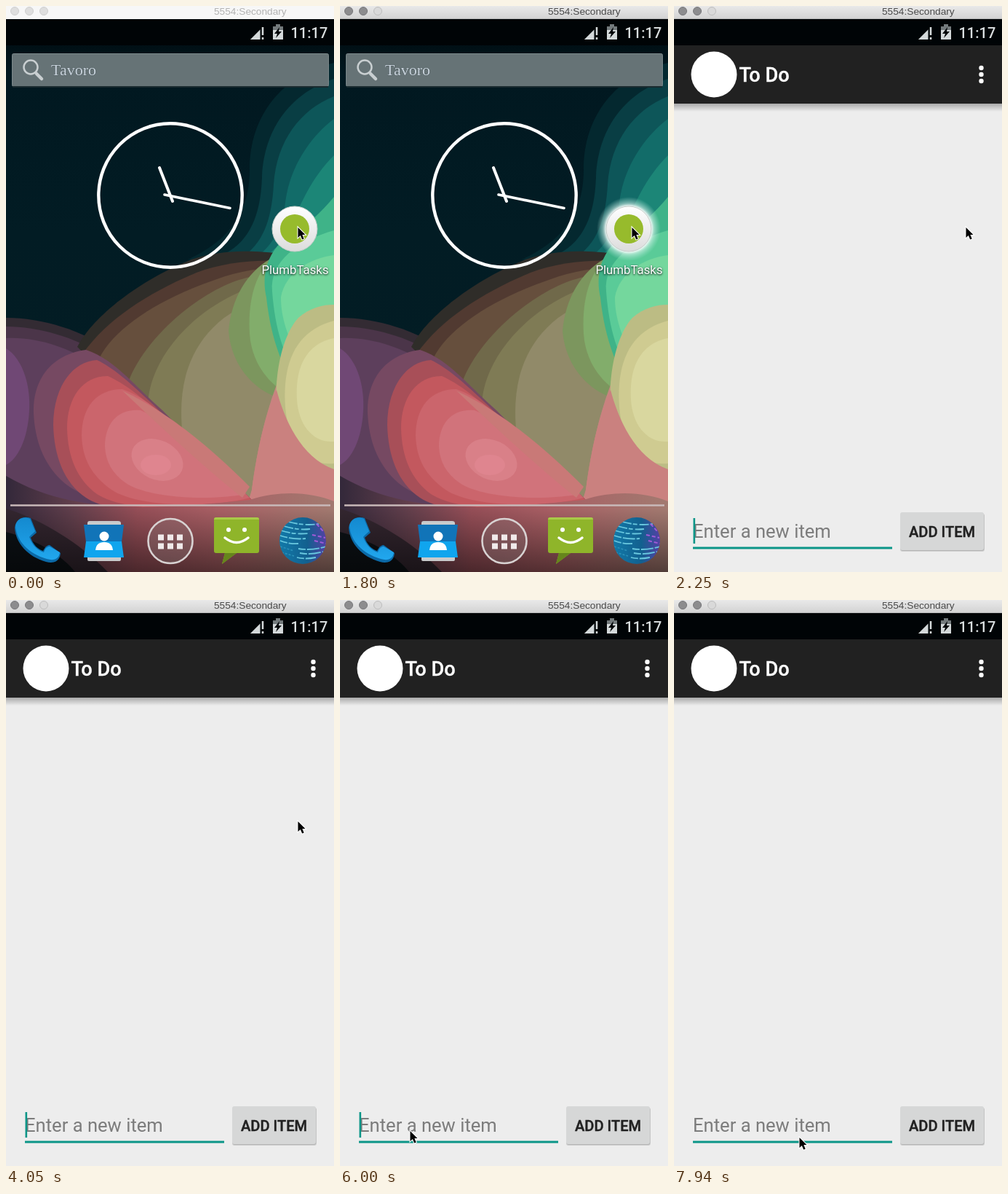
An HTML page that plays this animation: 451x777 px, repeating every 8000 ms.

```html
<!DOCTYPE html>
<html lang="en">
<head>
<meta charset="utf-8">
<title>To Do</title>
<style>
html, body { margin: 0; width: 100%; height: 100%; overflow: hidden; background: #000; }
svg { display: block; width: 451px; height: 777px; }
text { font-family: Roboto, "Open Sans", sans-serif; }
.title { font: 13.7px "Liberation Sans", sans-serif; }
.medium { font-weight: 500; stroke-width: .4px; }

.active, .glow, .app, .caret, .pointer { animation: 8s step-end infinite; }
.active { animation-name: activate; }
.glow { animation-name: press; }
.app { animation-name: launch; transform-origin: 0 0; }
.caret { animation-name: blink; }
.pointer { animation-name: travel; transform-origin: 0 0; }

@keyframes activate { 0% { visibility: hidden } 1.875%, 100% { visibility: visible } }
@keyframes press { 0% { visibility: hidden } 22.5%, 100% { visibility: visible } }
@keyframes launch {
  0% { visibility: hidden; transform: matrix(.956, 0, 0, .949, 19.5, 67.5) }
  26.25% { visibility: visible; transform: matrix(.956, 0, 0, .949, 19.5, 67.5) }
  28.125%, 100% { visibility: visible; transform: matrix(1, 0, 0, 1, 0, 54) }
}
@keyframes blink {
  0%, 37.5%, 50.625%, 63.75%, 75%, 88.125% { opacity: 1 }
  31.875%, 43.125%, 56.25%, 69.375%, 82.5%, 93.625%, 100% { opacity: 0 }
}
@keyframes travel {
  0% { transform: translate(401px, 303px) }
  63.75% { transform: translate(394px, 312px) }
  65.625% { transform: translate(361px, 356px) }
  67.5% { transform: translate(296px, 448px) }
  69.375% { transform: translate(214px, 566px) }
  71.25% { transform: translate(150px, 655px) }
  73.125% { transform: translate(108px, 712px) }
  75% { transform: translate(96px, 728px) }
  76.875% { transform: translate(104px, 735px) }
  78.75% { transform: translate(148px, 743px) }
  80.625% { transform: translate(216px, 738px) }
  82.5% { transform: translate(288px, 728px) }
  84.375% { transform: translate(342px, 717px) }
  86.25% { transform: translate(380px, 708px) }
  88.125% { transform: translate(401px, 702px) }
  89.875% { transform: translate(409px, 700px) }
  91.75% { transform: translate(421px, 707px) }
  93.625% { transform: translate(398px, 718px) }
  95.5% { transform: translate(318px, 729px) }
  97.375% { transform: translate(226px, 735px) }
  99.25%, 100% { transform: translate(172px, 737px) }
}
</style>
</head>
<body>
<svg viewBox="0 0 451 777">
  <defs>
    <linearGradient id="bar" x2="0" y2="1"><stop stop-color="#e9e9e9"/><stop offset="1" stop-color="#d2d2d2"/></linearGradient>
    <linearGradient id="sky" x2="0" y2="1">
      <stop stop-color="#000406"/><stop offset=".12" stop-color="#011820"/>
      <stop offset=".4" stop-color="#021c24"/><stop offset="1" stop-color="#041d24"/>
    </linearGradient>
    <linearGradient id="floor" x2="0" y2="1">
      <stop stop-color="#000" stop-opacity="0"/><stop offset="1" stop-color="#000" stop-opacity=".5"/>
    </linearGradient>
    <linearGradient id="ground">
      <stop stop-color="#33283a"/><stop offset=".2" stop-color="#603e4b"/><stop offset=".4" stop-color="#954e57"/>
      <stop offset=".65" stop-color="#a85f64"/><stop offset="1" stop-color="#a27a70"/>
    </linearGradient>
    <linearGradient id="drop" x2="0" y2="1"><stop stop-color="#000" stop-opacity=".29"/><stop offset="1" stop-color="#000" stop-opacity="0"/></linearGradient>
    <linearGradient id="blue" x2="0" y2="1"><stop stop-color="#1489cf"/><stop offset="1" stop-color="#21a7ee"/></linearGradient>
    <linearGradient id="globe"><stop stop-color="#1279a8"/><stop offset=".6" stop-color="#12608f"/><stop offset="1" stop-color="#5340a4"/></linearGradient>
    <radialGradient id="halo"><stop offset=".7" stop-color="#fff"/><stop offset=".8" stop-color="#d8f4ec" stop-opacity=".55"/><stop offset="1" stop-color="#b0e8da" stop-opacity="0"/></radialGradient>
    <linearGradient id="disc" x2="0" y2="1"><stop stop-color="#fff"/><stop offset="1" stop-color="#dcdcdc"/></linearGradient>
    <clipPath id="ball"><circle cx="408" cy="734" r="32"/></clipPath>
  </defs>

  <!-- wallpaper -->
  <rect width="451" height="777" fill="url(#sky)"/>
  <g>
    <path d="M451 78C380 95 335 150 335 225C335 290 300 325 250 348L451 370Z" fill="#04282f"/>
    <path d="M451 100C395 118 355 165 352 235C350 295 330 330 290 345L451 375Z" fill="#093e44"/>
    <path d="M451 124C405 142 372 185 368 245C365 300 350 330 320 348L451 385Z" fill="#0d5659"/>
    <path d="M451 155C420 178 390 220 384 270C380 305 365 335 335 350L451 395Z" fill="#126c69"/>
    <path d="M451 205C425 230 404 270 394 300C380 325 365 340 345 352L451 400Z" fill="#1c8677"/>

    <path d="M0 428C50 428 105 445 150 476L340 685L0 705Z" fill="#332b33"/>
    <path d="M0 440C45 440 95 455 130 478L335 685L0 700Z" fill="#4b3549"/>
    <path d="M98 468C120 425 185 376 255 348C310 330 360 336 451 350V690H330Z" fill="#2f2d29"/>
    <path d="M105 478C140 428 200 392 262 366C310 348 370 345 451 356V690H330Z" fill="#513a31"/>
    <path d="M128 484C150 440 215 400 290 375C330 360 380 354 451 362V690H330Z" fill="#664f3d"/>
    <path d="M165 525C180 475 235 415 300 384C335 367 390 360 451 370V690H335Z" fill="#70694a"/>
    <path d="M195 550C195 500 235 435 312 397C350 378 400 370 451 380V690H335Z" fill="#7f7b55"/>
    <path d="M243 590C236 530 246 470 300 428C340 398 400 400 451 420V690H335Z" fill="#918a69"/>
    <path d="M306 446C310 400 332 366 362 348H451V540H385C350 535 310 500 306 446Z" fill="#7c965e"/>
    <path d="M335 450C332 400 345 368 362 350L451 340V540H398C360 520 338 490 335 450Z" fill="#82ad6b"/>
    <path d="M358 400C350 365 362 332 392 314C415 300 432 285 451 262V530H400C378 490 364 455 358 400Z" fill="#3fb388"/>
    <path d="M366 392C362 350 402 322 451 308V510H402C382 480 370 445 366 392Z" fill="#5acb98"/>
    <path d="M378 400C384 366 418 346 451 342V490H404C392 460 378 435 378 400Z" fill="#74d79d"/>
    <path d="M338 664C346 604 358 556 374 515L451 500V690H335Z" fill="#c58680"/>
    <path d="M372 560C368 505 380 452 402 428C418 414 436 410 451 410V650C410 655 380 620 372 560Z" fill="#bcbc84"/>
    <path d="M384 550C380 490 398 446 451 432V628C412 632 388 600 384 550Z" fill="#cfcb91"/>
    <path d="M400 540C397 490 418 462 451 456V598C422 600 402 575 400 540Z" fill="#d9d79f"/>
    <path d="M338 664C346 604 358 556 372 527C382 565 405 620 451 636V690H330Z" fill="#ca817f"/>

    <path d="M0 456C45 454 85 470 120 490L340 680C240 710 80 700 0 650Z" fill="#5d3f5c"/>
    <path d="M38 560C36 510 65 478 110 472C150 485 180 525 215 555L340 680C250 700 120 695 75 650C50 625 40 595 38 560Z" fill="#764962"/>
    <path d="M0 470C20 482 34 515 32 555C30 595 16 622 0 630Z" fill="#704875"/>
    <path d="M65 575C65 525 90 488 125 486C165 505 205 552 340 680C260 698 150 702 110 675C80 655 66 618 65 575Z" fill="#a84f58"/>
    <path d="M84 580C84 538 105 508 140 508C180 526 215 562 340 680C270 695 165 696 125 670C98 650 85 620 84 580Z" fill="#c3585e"/>
    <path d="M104 590C104 550 125 526 160 526C200 540 240 580 335 675C280 690 180 688 145 664C118 645 105 622 104 590Z" fill="#cb656c"/>
    <path d="M136 605C136 572 155 552 185 555C225 572 270 615 330 670C275 680 195 675 165 655C146 642 137 625 136 605Z" fill="#d1737b"/>
    <path d="M160 528C195 545 250 575 335 660L325 675C280 640 220 585 160 528Z" fill="#c97977"/>
    <ellipse cx="208" cy="623" rx="37" ry="27" transform="rotate(24 208 623)" fill="#d98088"/>
    <ellipse cx="206" cy="630" rx="21" ry="14" fill="#df858f"/>

    <path d="M0 645C90 698 200 692 335 678C380 664 420 668 451 680V777H0Z" fill="url(#ground)"/>
    <path d="M0 690C50 705 105 740 140 777H0Z" fill="#33262f"/>
    <path d="M0 722C40 732 75 752 95 777H0Z" fill="#0d1216"/>
  </g>
  <rect y="690" width="451" height="87" fill="url(#floor)"/>

  <!-- search bar -->
  <rect x="8.500" y="65.500" width="435" height="45" rx="2" fill="#667376" stroke="#7c888a"/>
  <path d="M9 111H443" stroke="#192a2f" stroke-width="2"/>
  <g fill="none" stroke="#c9cfd1" stroke-linecap="round">
    <circle cx="34" cy="84" r="9.500" stroke-width="2.500"/><path d="M42 93L49 100" stroke-width="4.500"/>
  </g>
  <text x="62" y="95" font-size="22" fill="#cbd6df" stroke="#3d484d" stroke-width=".6" paint-order="stroke" style="font-family:'Liberation Serif',serif">Tavoro</text>

  <!-- clock -->
  <g fill="none" stroke="#fff" stroke-linecap="round">
    <circle cx="226" cy="260" r="98.700" stroke-width="4.400"/>
    <path d="M211 222L229 268" stroke-width="4"/><path d="M218 259L308 277.500" stroke-width="3.600"/>
  </g>

  <!-- launcher icon -->
  <circle class="glow" cx="397" cy="306" r="44" fill="url(#halo)"/>
  <circle cx="397" cy="306" r="31" fill="url(#disc)" stroke="#c3ccc8"/>
  <circle cx="397" cy="306" r="20" fill="#97bb2c"/>
  <text x="397.500" y="368" text-anchor="middle" font-size="16.800" fill="#fff" style="text-shadow:0 1px 3px #000">PlumbTasks</text>

  <!-- dock -->
  <path d="M6 685.500H446" stroke="#c9b9b9" stroke-width="2.600"/>
  <path d="M12 716C14 704 24 699 34 703L42 723C37 727 35 729 34 730C37 739 44 746 51 748C54 742 57 740 60 740L75 751C74 762 66 766 55 763C30 756 13 737 12 716Z" fill="#0b6aa8"/>
  <path d="M13 713C15 704 24 700 33 704L40 721C36 725 33 727 32 729C36 740 43 747 52 750C54 744 57 742 60 742L74 750C73 759 66 762 56 759C32 752 14 735 13 713Z" fill="url(#blue)"/>
  <path d="M112 710Q112 707 115 707H154Q158 707 158 710V760Q158 762 155 762H114Q112 762 112 760Z" fill="#c9cbcc"/>
  <path d="M107 712H162L159 736H110Z" fill="#1174b8"/><path d="M110 735H159L162 757H107Z" fill="#10a5ee"/>
  <g fill="#fff"><circle cx="135" cy="728" r="6.500"/><path d="M123 747Q124 736 135 736Q146 736 147 747Z"/></g>
  <circle cx="226" cy="734.500" r="30.500" fill="#8a7d7d" fill-opacity=".3" stroke="#d8d2d2" stroke-width="2.600"/>
  <path d="M209 729.500H243M209 741.500H243" stroke="#f0eaea" stroke-width="8" stroke-dasharray="8 5"/>
  <path d="M289 702H345Q348 702 348 705V748Q348 751 345 751H317L297 766L301 751H289Q286 751 286 748V705Q286 702 289 702Z" fill="#8fb52a"/>
  <path d="M286 705Q286 702 289 702H345Q348 702 348 705Z" fill="#a9ca48"/>
  <path d="M301 751L297 766L317 751Z" fill="#66851c"/>
  <circle cx="306" cy="719" r="3" fill="#fff"/><circle cx="328" cy="719" r="3" fill="#fff"/>
  <path d="M301 730Q317 743 333 730" fill="none" stroke="#fff" stroke-width="3.500" stroke-linecap="round"/>
  <circle cx="408" cy="734" r="32" fill="url(#globe)"/>
  <g clip-path="url(#ball)" fill="none">
    <g stroke="#69c8df" stroke-width="1.800">
      <path d="M388 708Q410 714 430 711M382 714Q402 720 418 718M378 720Q396 726 415 724" stroke-dasharray="13 2 6 3"/>
      <path d="M377 727Q396 733 412 731M377 734Q390 739 402 738M402 745Q420 748 440 742M404 751Q420 754 436 749M400 757Q412 760 426 757" stroke-dasharray="10 2 17 2"/>
    </g>
    <path d="M427 711L437 722M421 726L439 730M424 734L440 738" stroke="#a05ad8" stroke-width="2" stroke-dasharray="5 3"/>
    <path d="M377 742L396 748M379 750L396 755" stroke="#2b91b8" stroke-width="1.500" stroke-dasharray="3 2"/>
  </g>

  <!-- status bar -->
  <rect y="18" width="451" height="36" fill="#000406"/>
  <path d="M355 27V46H336Z" fill="#62696b"/><path d="M349 33V46H336Z" fill="#d4d9da"/>
  <path d="M350 26H356V47H350Z" fill="#000406"/><path d="M353 29V40M353 43V46" stroke="#d4d9da" stroke-width="2.500"/>
  <path d="M371 25H377V28H381V46H367V28H371Z" fill="#737a7c"/><path d="M367 33H381V46H367Z" fill="#d4d9da"/>
  <path d="M376 29L369 38H373L371 44L379 35H375Z" fill="#000406"/>
  <text class="medium" x="391.500" y="44" font-size="20" fill="#d9dedf">11:17</text>

  <!-- title bar -->
  <rect width="451" height="18" fill="#f7f7f7"/>
  <g fill="#dedede" stroke="#cfcfcf"><circle cx="12" cy="7" r="5.500"/><circle cx="32" cy="7" r="5.500"/><circle cx="52" cy="7" r="5.500"/></g>
  <text class="title" x="286" y="12" fill="#b2b2b2">5554:Secondary</text>
  <g class="active">
    <rect width="451" height="18" fill="url(#bar)"/><rect y="17" width="451" height="1" fill="#b8b8b8"/>
    <g fill="#8c8c8e" stroke="#77777a"><circle cx="12" cy="7" r="5.500"/><circle cx="32" cy="7" r="5.500"/></g>
    <circle cx="52" cy="7" r="5.500" fill="#d9d9d9" stroke="#bdbdbd"/>
    <text class="title" x="286" y="12" fill="#4a4a4a">5554:Secondary</text>
  </g>

  <!-- to-do window -->
  <g class="app">
    <rect width="451" height="723" fill="#ededed"/>
    <rect y="80" width="451" height="11" fill="url(#drop)"/>
    <rect width="451" height="80" fill="#212121"/>
    <circle cx="55" cy="40" r="31.500" fill="#fff"/>
    <text class="medium" x="89.500" y="50" font-size="27.200" fill="#fff" stroke="#fff">To Do</text>
    <g fill="#fff"><circle cx="422.500" cy="31" r="3.200"/><circle cx="422.500" cy="40" r="3.200"/><circle cx="422.500" cy="49" r="3.200"/></g>
    <text x="26" y="676" font-size="25.600" fill="#7c7c7c">Enter a new item</text>
    <rect x="26" y="688.500" width="274" height="3" fill="#0b9688"/>
    <rect class="caret" x="26.500" y="649" width="2.600" height="35" fill="#0b9688"/>
    <rect x="311" y="643" width="116" height="52" rx="3" fill="#000" opacity=".12"/>
    <rect x="311.500" y="642" width="115" height="52" rx="3" fill="#000" opacity=".13"/>
    <rect x="311" y="641" width="115" height="52" rx="3" fill="#d6d7d7"/>
    <text class="medium" x="368.500" y="674.500" text-anchor="middle" font-size="20.100" fill="#212121" stroke="#212121">ADD ITEM</text>
  </g>

  <path class="pointer" d="M.5 1V15L3.800 12L6.200 17.500L8.700 16.400L6.400 11H10.500Z" fill="#000" stroke="#fff" stroke-width="2" paint-order="stroke"/>
</svg>
</body>
</html>
```
